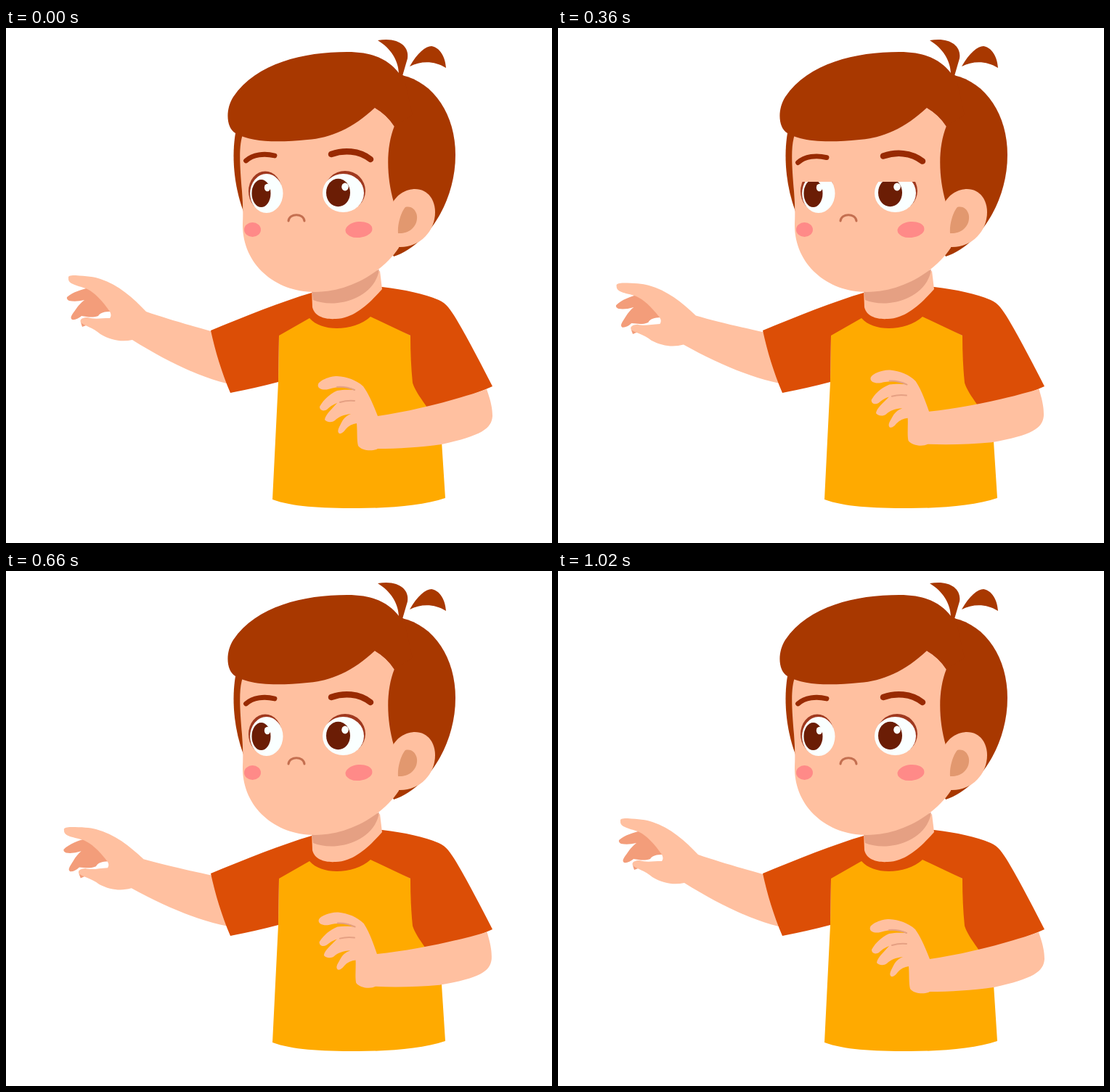
An HTML page for the animation above (1.05 s loop, 752x710 px).

```html
<!DOCTYPE html>
<html lang="en">
<head>
<meta charset="utf-8">
<title>Boy reaching out</title>
<style>
  html, body { margin: 0; width: 100%; height: 100%; overflow: hidden; background: #fff; }
  svg { display: block; width: 752px; height: 710px; }
  .skin { fill: #ffc0a0; }
  .hair { fill: #a83800; }
  .shade { fill: #e5a083; }
  .line { fill: none; stroke-linecap: round; }
</style>
</head>
<body>
<svg viewBox="0 0 752 710">
  <clipPath id="open"><rect id="lid" x="320" y="190" width="190" height="80"/></clipPath>

  <g id="farArm">
    <path fill="#f39d7a" d="M84 371C92 364 105 360 115 358C132 364 143 378 144 391C136 391 130 392 127 397C118 400 112 398 104 397Q97 403 91 402C87 399 92 394 96 388C100 382 104 378 108 375Q96 378 87 376Q83 374 84 371ZM103 406L105 412L113 409Z"/>
    <path class="skin" d="M86 345C85 341 90 341 96 341C110 342 122 343 130 346C155 354 175 372 193 391C225 402 260 412 320 428L330 495C285 490 230 465 174 430C160 433 145 431 130 422C120 413 107 410 103 406C101 401 106 399 112 399C122 402 130 400 143 400Q146 396 143 391C132 375 122 365 112 360C100 355 85 354 86 345Z"/>
  </g>

  <g id="shirt">
    <path fill="#ffaa00" d="M376 420L418 395H502L557 424L580 500L600 570L605 648C575 658 530 662 485 662C430 662 395 660 367 650L375 488Z"/>
    <path fill="#dc4e06" d="M282 417C330 397 380 377 421 365L518 357C550 361 575 366 596 375C607 380 612 388 620 401C640 435 655 465 670 494Q635 510 580 523C570 509 562 497 560 489Q557 460 557 424L502 398C480 418 435 420 418 400L376 424L375 488Q345 496 309 503C297 475 288 445 282 417Z"/>
  </g>

  <g id="nearArm">
    <path class="skin" d="M430 491C432 486 445 480 456 480C470 481 482 485 492 494C500 505 506 520 512 535C560 528 615 514 662 498C668 515 670 525 670 535C669 552 655 562 600 574C570 578 540 580 512 580C505 584 490 583 485 576C483 568 484 555 483 545Q474 546 468 553Q463 560 459 559C455 556 459 550 462 544C466 536 471 534 475 532C465 533 458 536 453 541C448 545 441 543 439 540C440 533 448 526 456 517Q448 520 442 526C437 529 432 527 432 522C437 513 445 505 456 500C466 498 475 499 481 499C470 493 455 495 444 498C436 500 428 497 430 491Z"/>
    <path class="line" stroke="#e5a083" stroke-width="2" d="M456 495Q468 494 480 499M460 516Q470 513 480 514"/>
  </g>

  <path class="skin" d="M421 360L422 385C425 398 440 402 454 401C480 400 500 380 518 360L515 335Z"/>
  <path class="shade" d="M421 362L423 375C455 388 508 372 514 333Z"/>

  <path class="hair" d="M545 65C590 75 619 120 619 175C619 240 580 300 534 315L500 250V100Z"/>
  <path class="hair" d="M316 145C311 175 313 215 327 253L345 150Z"/>
  <path class="skin" d="M327 145C320 160 322 190 325 225Q327 250 326 270C325 325 370 364 425 364C475 364 520 335 541 303L550 250L534 240C524 205 523 165 535 135Q525 120 508 110L400 100Z"/>
  <path class="skin" d="M533 240C542 225 556 222 563 222C582 222 591 238 591 254C591 280 570 303 541 302Z"/>
  <path fill="#e2986f" d="M550 247C562 244 567 256 566 263C565 276 553 284 540 283C539 270 544 254 550 247Z"/>
  <path class="hair" d="M316 145C303 138 302 112 313 95C345 48 410 33 470 33C508 33 528 45 541 62L548 66L560 120L535 136Q524 119 508 110C478 138 447 152 415 154C375 158 338 158 316 145Z"/>
  <path class="hair" d="M512 17C540 12 556 25 553 42L546 66L541 64C541 45 530 28 512 17ZM556 53C566 35 578 25 586 25C598 27 605 40 606 55C590 45 572 45 556 53Z"/>

  <g fill="#ff8a88">
    <ellipse cx="339.5" cy="278" rx="11.5" ry="10"/>
    <ellipse cx="486" cy="278" rx="18.5" ry="11" transform="rotate(-5 486 278)"/>
  </g>
  <path class="line" stroke="#c46f50" stroke-width="3" d="M389 266C390 255 410 255 411 266"/>

  <g clip-path="url(#open)">
    <g fill="#a0391f">
      <ellipse cx="357" cy="225" rx="23" ry="27.5"/>
      <ellipse cx="467" cy="224.5" rx="28" ry="27.5"/>
    </g>
    <g fill="#faffff">
      <ellipse cx="358.8" cy="228" rx="22.7" ry="27"/>
      <ellipse cx="464.5" cy="227.5" rx="28.5" ry="26.5"/>
    </g>
    <g fill="#6b1d05">
      <ellipse cx="351.5" cy="228" rx="13" ry="19"/>
      <ellipse cx="457.5" cy="227" rx="16.5" ry="19.3"/>
    </g>
    <g fill="#faffff">
      <ellipse cx="360" cy="220" rx="4.2" ry="5.2"/>
      <ellipse cx="467" cy="219" rx="4.8" ry="5.4"/>
    </g>
  </g>

  <g id="brows" class="line" stroke="#982a02">
    <path stroke-width="6.8" d="M330.5 183C340 174 356 172.500 370 176"/>
    <path stroke-width="8.5" d="M448 174C465 168 486 168.500 502 181"/>
  </g>
</svg>
<script>
  const LOOP = 1050, STEP = 30, TURN = 540, END = 1020;
  const part = id => document.getElementById(id);
  const smooth = (t, from, to) => {
    const x = Math.min(1, Math.max(0, (t - from) / (to - from)));
    return x * x * (3 - 2 * x);
  };
  const swing = t => (1 - Math.cos(Math.PI * (t < TURN ? t / TURN : (END - t) / (END - TURN)))) / 2;
  const blink = t => smooth(t, 300, 480) - smooth(t, 510, 650);

  function draw(now) {
    const t = Math.floor((now % LOOP) / STEP) * STEP;
    const reach = swing(t), shut = blink(t);
    part('farArm').setAttribute('transform', `rotate(${-3.9 * reach} 300 455)`);
    part('nearArm').setAttribute('transform', `rotate(${3 * reach} 670 508)`);
    part('brows').setAttribute('transform', `translate(0 ${10 * shut})`);
    part('lid').setAttribute('y', 197 + 58 * shut);
  }

  let start;
  function tick(now) {
    start ??= now;
    draw(now - start);
    requestAnimationFrame(tick);
  }
  draw(0);
  requestAnimationFrame(tick);
</script>
</body>
</html>
```
